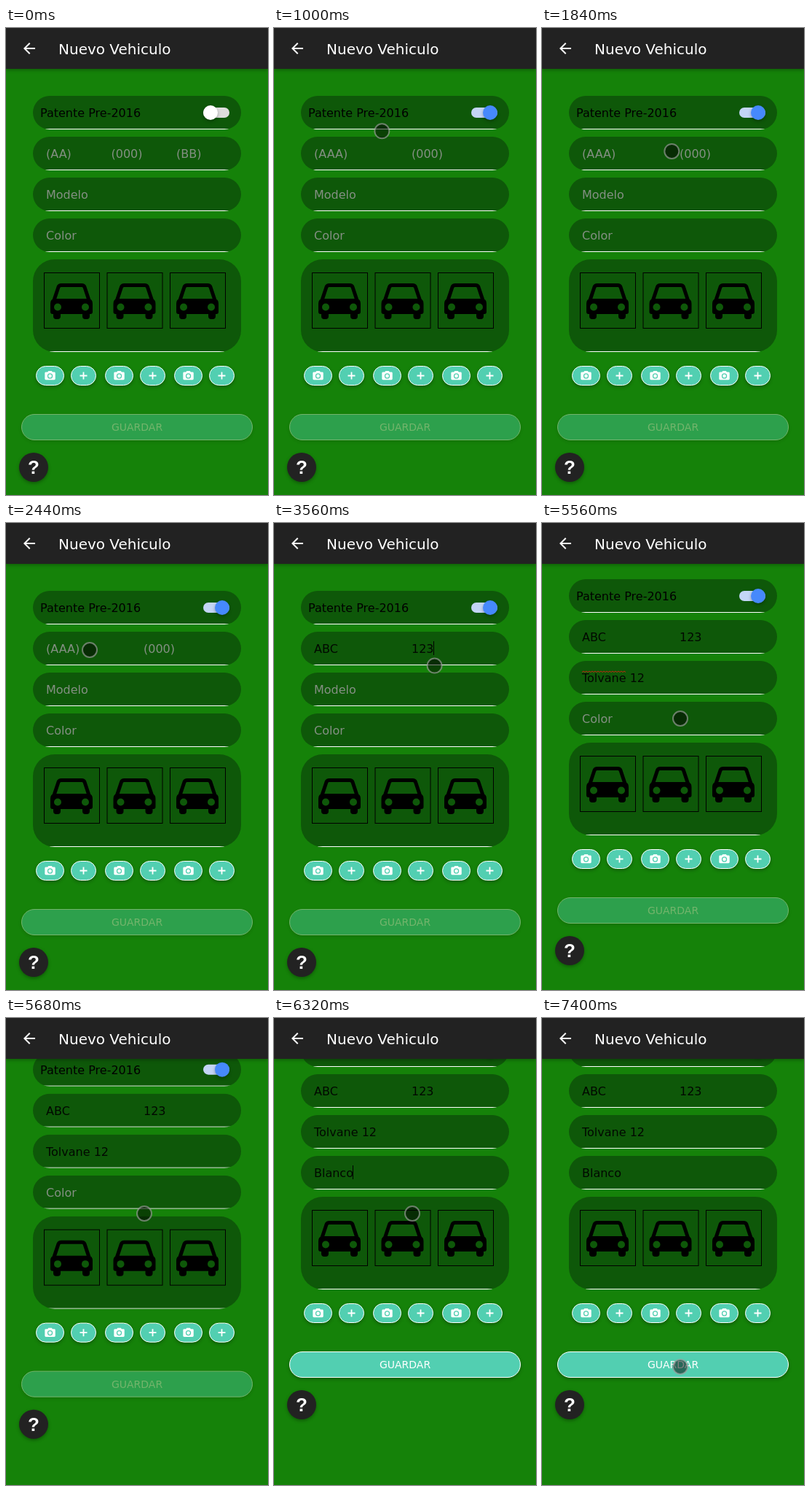
Recreate the animation shown at these times as an HTML page. Size 360 px wide and 640 px high, loop 7.44 s.

```html
<!DOCTYPE html>
<html lang="es">
<head>
<meta charset="utf-8">
<title>Nuevo Vehiculo</title>
<style>
html, body { margin: 0; width: 100%; height: 100%; overflow: hidden; background: #158209; }
svg { display: block; width: 100vw; height: 100vh; font: 16px "DejaVu Sans", sans-serif; }
.lift { filter: drop-shadow(0 2px 2px rgba(0,0,0,.3)); }
.pill { fill: #52cfb1; stroke: #fff; }
</style>
</head>
<body>
<svg viewBox="0 0 360 640">
  <defs>
    <clipPath id="rowClip"><rect x="37" width="286" height="46" rx="23"/></clipPath>
    <clipPath id="boxClip"><rect x="37" width="286" height="127" rx="30"/></clipPath>
    <g id="row" clip-path="url(#rowClip)">
      <rect x="37" width="286" height="46" fill="#0e5809"/>
      <rect x="37" y="45" width="286" height="1" fill="#fff"/>
    </g>
    <g id="car">
      <rect x=".5" y=".5" width="76" height="76" fill="none" stroke="#000"/>
      <path d="M14 38L20 20Q21 17.500 24 17.500H52Q55 17.500 56 20L62 38" fill="none" stroke="#000" stroke-width="5"/>
      <path d="M9 43Q9 36 15 36H61Q67 36 67 43V54Q67 57 64 57H63V60Q63 64 59 64H57Q53 64 53 60V57H23V60Q23 64 19 64H17Q13 64 13 60V57H12Q9 57 9 54Z"/>
      <g fill="#0e5809"><circle cx="19" cy="47.500" r="5"/><circle cx="57" cy="47.500" r="5"/></g>
    </g>
    <g id="shot">
      <rect class="pill lift" x=".5" y=".5" width="38" height="26" rx="13"/>
      <g transform="translate(10.900 4.900) scale(.72)" fill="#fff">
        <path d="M9 3L7.200 5H4Q2 5 2 7V18Q2 20 4 20H20Q22 20 22 18V7Q22 5 20 5H16.800L15 3Z"/>
        <circle cx="12" cy="12.500" r="4.200" fill="none" stroke="#52cfb1" stroke-width="1.800"/>
      </g>
    </g>
    <g id="plus">
      <rect class="pill lift" x=".5" y=".5" width="34" height="26" rx="13"/>
      <path d="M12.500 13.500H22.500M17.500 8.500V18.500" stroke="#fff" stroke-width="1.800"/>
    </g>
  </defs>
  <rect width="360" height="640" fill="#158209"/>
  <g id="page">
    <g id="parts"></g>
    <text x="47" y="122">Patente Pre-2016</text>
    <rect id="track" x="271" y="109" width="36" height="14" rx="7"/>
    <circle id="knob" class="lift" cy="116" r="10"/>
    <g id="inputs"></g>
    <path id="wave" fill="none" stroke="#c02810" stroke-width="1"/>
    <rect id="caret" width="1" height="19"/>
    <g id="save">
      <rect class="pill lift" x="21.500" y="529.500" width="317" height="35" rx="17.500"/>
      <text x="180" y="552" font-size="14" fill="#fff" text-anchor="middle">GUARDAR</text>
    </g>
    <circle class="lift" cx="38" cy="602" r="20" fill="#222"/>
    <text x="38" y="611" text-anchor="middle" fill="#fff" style="font: bold 26px 'Liberation Sans', sans-serif">?</text>
  </g>
  <g fill="#fff">
    <rect width="360" height="56" fill="#222" style="filter: drop-shadow(0 2px 2px rgba(0,0,0,.25))"/>
    <path transform="translate(20 16)" d="M20 11H7.830l5.590-5.590L12 4l-8 8 8 8 1.410-1.410L7.830 13H20z"/>
    <text x="72" y="36" font-size="20">Nuevo Vehiculo</text>
  </g>
  <circle id="touch" r="10" fill="#000" fill-opacity=".5" stroke="#a0a0a0" stroke-opacity=".65" stroke-width="2"/>
</svg>
<script>
const LOOP = 7440, TOGGLE = 680;
const $ = id => document.getElementById(id);
const set = (el, attrs) => { for (const k in attrs) el.setAttribute(k, attrs[k]); };
const use = (id, x, y) => `<use href="#${id}" x="${x}" y="${y}"/>`;

const clamp = u => Math.min(1, Math.max(0, u));
const smooth = u => u * u * (3 - 2 * u);
const speedUp = u => u * u;
const slowDown = u => u * (2 - u);
const cubicOut = u => 1 - (1 - u) ** 3;
const span = (t, start, length) => clamp((t - start) / length);
const mix = (a, b, u) => `rgb(${a.map((v, i) => v + (b[i] - v) * u)})`;

$('parts').innerHTML =
  [93, 149, 205, 261].map(y => use('row', 0, y)).join('') +
  `<g transform="translate(0 317)" clip-path="url(#boxClip)">
    <rect x="37" width="286" height="127" fill="#0e5809"/>
    <rect x="37" y="126" width="286" height="1" fill="#fff"/></g>` +
  [52, 138.5, 225].map(x => use('car', x, 335)).join('') +
  [41, 136, 231].map(x => use('shot', x, 463) + use('plus', x + 48, 463)).join('');

// hint: [before, after the switch]; keys: time of each typed letter; on: caret spans
const fields = [
  { x: [55, 55], y: 149, hint: ['(AA)', '(AAA)'], text: 'ABC', keys: [2680, 2760, 2880], on: [[2480, 3160]] },
  { x: [144.5, 189], y: 149, hint: ['(000)', '(000)'], text: '123', keys: [3320, 3400, 3480], on: [[3200, 3680]] },
  { x: [234, 234], y: 149, hint: ['(BB)', ''], text: '', keys: [], on: [] },
  { x: [55, 55], y: 205, hint: ['Modelo', 'Modelo'], text: 'Tolvane 12',
    keys: [4400, 4560, 4640, 4720, 4800, 4840, 4920, 5000, 5160, 5200], on: [[3820, 4320], [4400, 5440]] },
  { x: [55, 55], y: 261, hint: ['Color', 'Color'], text: 'Blanco',
    keys: [5960, 6040, 6120, 6240, 6280, 6320], on: [[5830, 7400]] }
];
for (const f of fields) {
  f.el = document.createElementNS('http://www.w3.org/2000/svg', 'text');
  set(f.el, { y: f.y + 29 });
  $('inputs').append(f.el);
}

// time, x, y, easing towards this point
const path = [
  [120, 372, 190], [560, 286, 118], [840, 286, 118],
  [1000, 149, 141, speedUp], [1200, 84, 170, slowDown], [1520, 82, 171], [1640, 82, 171],
  [1960, 222, 168], [2080, 222, 169], [2400, 115, 174], [2920, 115, 174], [3120, 217, 179],
  [3500, 217, 179], [3660, 228, 230], [5440, 228, 230], [5560, 190, 268],
  [6560, 190, 268], [7280, 190, 478], [LOOP, 190, 478]
];

function touchAt(t) {
  const i = path.findIndex(p => p[0] > t);
  const [t0, x0, y0] = path[i - 1], [t1, x1, y1, ease = smooth] = path[i];
  const u = ease((t - t0) / (t1 - t0));
  return { cx: x0 + (x1 - x0) * u, cy: y0 + (y1 - y0) * u };
}

function drawField(f, t, wide) {
  const typed = f.text.slice(0, f.keys.filter(k => k <= t).length);
  f.el.textContent = typed || f.hint[wide];
  set(f.el, { x: f.x[wide], fill: typed ? '#000' : '#999', 'fill-opacity': typed ? .9 : .85 });
  if (f.on.some(([a, b]) => t >= a && t < b)) {
    // a trailing blank is not measured, so it is added here
    const width = typed ? f.el.getComputedTextLength() + (typed.endsWith(' ') ? 5 : 0) : 0;
    set($('caret'), { x: Math.round(f.x[wide] + width - .5), y: f.y + 13, visibility: 'visible' });
  }
}

function draw(t) {
  const flip = smooth(span(t, TOGGLE, 300)), wide = +(t >= TOGGLE);
  const scroll = 16 * cubicOut(span(t, 3670, 150)) + 56 * cubicOut(span(t, 5640, 187));
  set($('page'), { transform: `translate(0 ${-scroll})` });
  set($('track'), { fill: mix([221, 221, 221], [195, 213, 246], flip) });
  set($('knob'), { cx: 281 + 16 * flip, fill: mix([255, 255, 255], [70, 137, 252], flip) });

  set($('caret'), { visibility: 'hidden' });
  fields.forEach(f => drawField(f, t, wide));

  const checked = t >= 5000 && t < 5640;
  set($('wave'), { d: checked ? 'M55 220.500' + 'l2 -1.500l2 1.500'.repeat(15) : '' });
  set($('save'), { opacity: t >= fields[4].keys[0] ? 1 : .4 });

  const shown = t >= path[0][0];
  set($('touch'), { visibility: shown ? 'visible' : 'hidden' });
  if (shown) set($('touch'), touchAt(t));
}

const start = performance.now();
function tick() {
  draw((performance.now() - start) % LOOP);
  requestAnimationFrame(tick);
}
tick();
</script>
</body>
</html>
```
